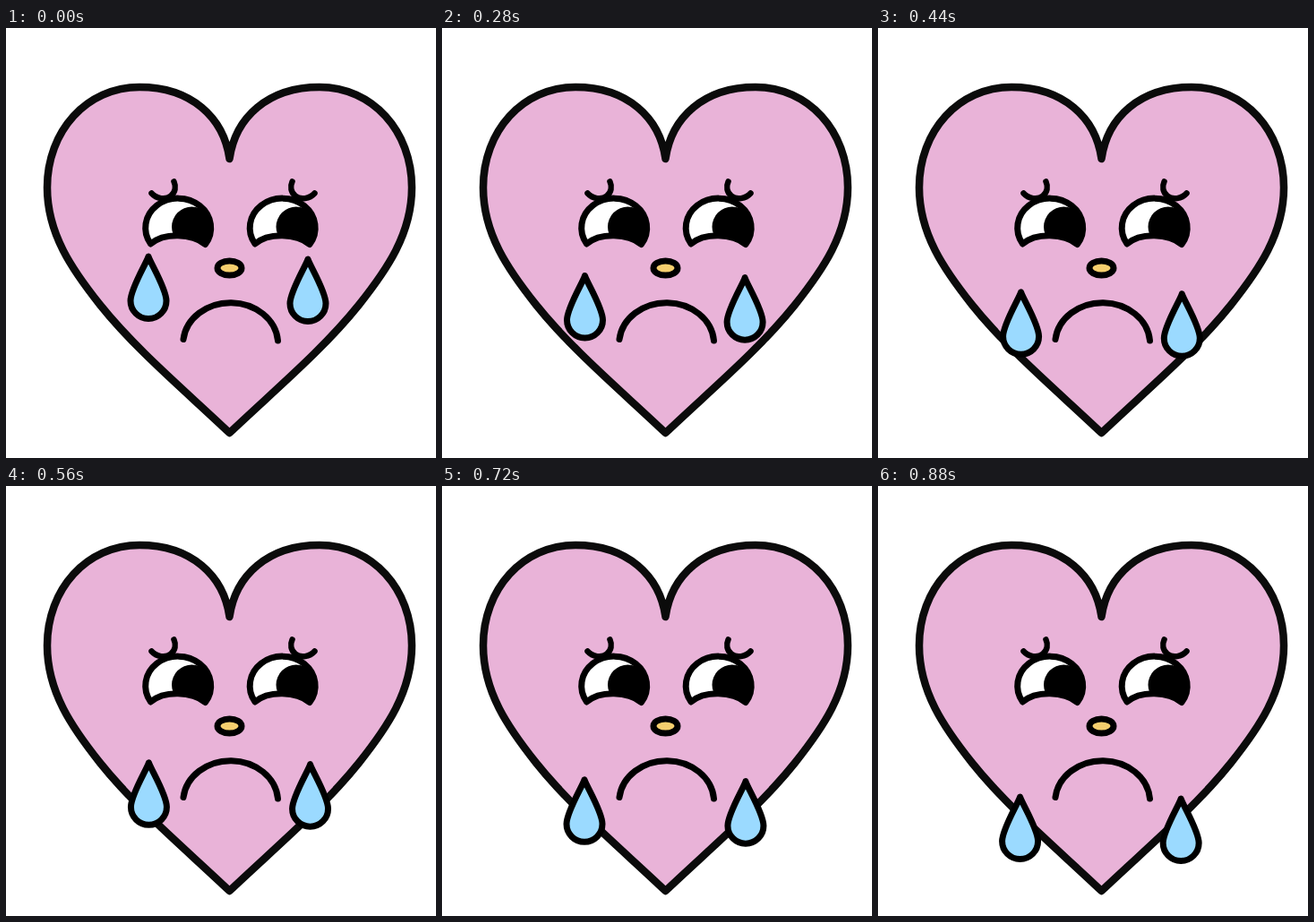
An HTML page for the animation above (920 ms loop, 480 by 480 pixels).

```html
<!DOCTYPE html>
<html lang="en">
<head>
<meta charset="utf-8">
<title>Crying heart</title>
<style>
  html, body { margin: 0; width: 100%; height: 100%; overflow: hidden; background: #fff; }
  svg { display: block; width: 100%; height: 100%; }
</style>
</head>
<body>
<svg viewBox="0 0 480 480" fill="none" stroke="#000" stroke-width="7" stroke-linecap="round" stroke-linejoin="round">
  <defs>
    <g id="eye">
      <path id="lid" fill="#fff" d="M161.5 241A36.5 33 0 1 1 222.5 241.5C208 229 176 228 161.5 241Z"/>
      <circle cx="207.5" cy="222" r="22.5" fill="#000" stroke="none" clip-path="url(#eyeClip)"/>
    </g>
    <clipPath id="eyeClip"><use href="#lid"/></clipPath>
    <path id="brow" stroke-width="6.5" d="M162.500 184.500C168 190.500 178 192.500 184 187.500C189 183.500 190 177 187.500 171.500"/>
    <path id="drop" fill="#9bdaff" d="M0 0C-2 7-20 36-20 49.500A20 20 0 0 0 20 49.500C20 36 2 7 0 0Z"/>
  </defs>

  <path fill="#e9b3d8" stroke="#0b0b0b" stroke-width="8.500" d="M249.500 146C243 100 207 66 149 66C90 66 46 115 46 178C46 230 74 270 105 309C145 359 200 405 249.500 452C299 405 354 359 394 309C425 270 453 230 453 178C453 115 409 66 350 66C292 66 256 100 249.500 146Z"/>

  <use href="#brow"/>
  <use href="#brow" transform="translate(507 0) scale(-1 1)"/>
  <use href="#eye"/>
  <use href="#eye" x="116.500"/>
  <ellipse cx="249.500" cy="268" rx="13.500" ry="8" fill="#f5cf6e"/>
  <path d="M198 347.500A53 46 0 0 1 303.500 349"/>

  <use id="left" href="#drop"/>
  <use id="right" href="#drop"/>
</svg>
<script>
  const LOOP = 920, HOLD = 120, STEP = 40, STEPS = 20;
  const left = document.getElementById('left');
  const right = document.getElementById('right');

  const place = (el, x, y) => el.setAttribute('transform', `translate(${x} ${y})`);

  function draw(ms) {
    const t = ms % LOOP;
    const n = t < HOLD ? 0 : 1 + Math.floor((t - HOLD) / STEP);
    const u = n / STEPS;
    // Nearly steady fall with a slight sideways sway
    place(left, 159 + 0.6 * Math.sin(n * Math.PI / 16), 255 + 92 * u ** 1.05);
    place(right, 338 + u - Math.cos(n * Math.PI / 11), 258 + 91 * u ** 1.07);
  }

  let start;
  function tick(now) {
    start ??= now;
    draw(now - start);
    requestAnimationFrame(tick);
  }
  draw(0);
  requestAnimationFrame(tick);
</script>
</body>
</html>
```
